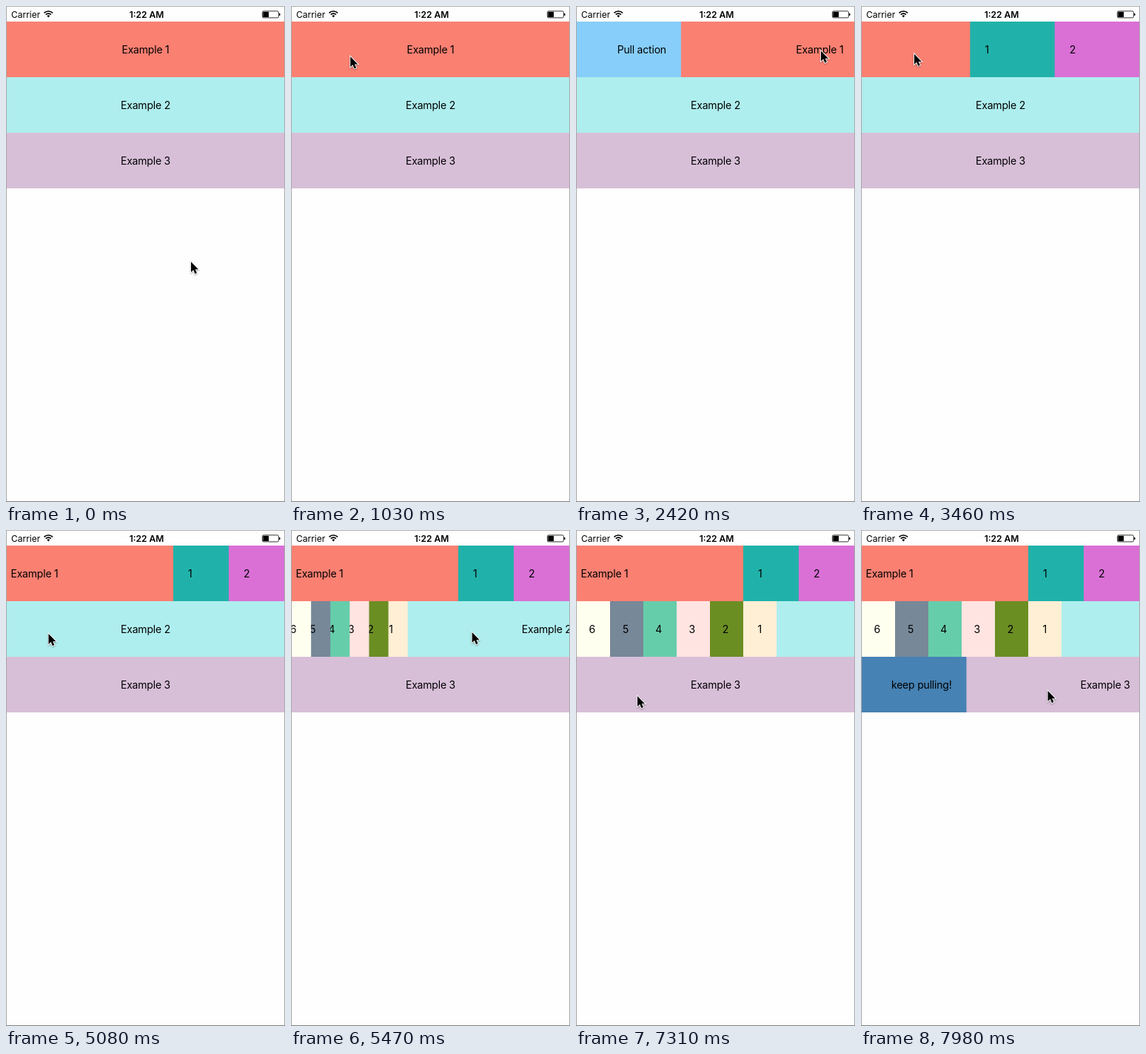
These frames come from a looping animation (377x669 px, 8 s). An HTML page with a canvas:

```html
<!DOCTYPE html>
<html lang="en">
<head>
<meta charset="utf-8">
<title>Swipeable rows</title>
<style>
html, body { margin: 0; width: 100%; height: 100%; overflow: hidden; background: #fefefe; }
canvas { display: block; width: 377px; height: 669px; }
</style>
</head>
<body>
<canvas id="stage" width="377" height="669"></canvas>
<script>
const ctx = document.getElementById('stage').getContext('2d');
const LOOP = 8000, LEFT = 1, W = 375, ROW = 75, PAD = 20;
const FONT = 'Inter, Roboto, sans-serif';

// Pointer: start, end, target x, target y, sharpness of the ease
const home = [250, 345];
const moves = [
  [570, 1170, 74, 58, 3],
  [1340, 2130, 331, 60.5, 6.83],
  [3070, 3770, 53, 65, 5],
  [4590, 4810, 57.5, 140, 3],
  [5080, 5590, 247, 138, 4],
  [6890, 7310, 83, 224, 3],
  [7550, 7980, 252.5, 217, 4]
];

function pointer(t) {
  let [x, y] = home;
  for (const [a, b, tx, ty, k] of moves) {
    if (t < a) break;
    const p = Math.min(1, (t - a) / (b - a));
    const e = 1 - Math.pow(1 - Math.pow(p, 1.5), k);
    x += (tx - x) * e;
    y += (ty - y) * e;
  }
  return [x, y];
}

// Row follows the pointer once it has passed the grab point
function drag(t, start, grab, dir) {
  if (t < start) return 0;
  const d = pointer(t)[0] - grab;
  return dir > 0 ? Math.max(0, d) : Math.min(0, d);
}

// Spring to the snap position, shown in a few discrete steps
function settle(t, from, to, begin, first, last, steps) {
  if (t < first) return from;
  const gap = (last - first) / (steps - 1);
  const shown = first + Math.floor((t - first) / gap) * gap;
  const p = Math.min(1, (shown - begin) / 250);
  return to + (from - to) * Math.pow(Math.cos(p * Math.PI / 2), 4);
}

function offsets(t) {
  let one;
  if (t < 3070) one = settle(t, drag(Math.min(t, 2340), 1340, 113, 1), 0, 2347, 2420, 2630, 4);
  else one = settle(t, drag(Math.min(t, 3940), 3070, 300.5, -1), -150, 3925, 3950, 4210, 6);
  const two = settle(t, drag(Math.min(t, 5900), 5080, 88, 1), 270, 5930, 6000, 6200, 4);
  return [one, two, drag(t, 7550, 111, 1)];
}

const rows = [
  { color: '#fa8072', label: 'Example 1',
    left: [['#87cefa', 'Pull action']],
    right: [['#20b2aa', '1'], ['#da70d6', '2']] },
  { color: '#afeeee', label: 'Example 2',
    left: [['#ffefd5', '1'], ['#6b8e23', '2'], ['#ffe4e1', '3'],
           ['#66cdaa', '4'], ['#778899', '5'], ['#fffff0', '6']] },
  { color: '#d8bfd8', label: 'Example 3',
    left: [['#4682b4', 'keep pulling!']] }
];

function box(color, x, y, w, h) {
  ctx.fillStyle = color;
  ctx.fillRect(x, y, w, h);
}

function text(str, x, y, align, font = '400 14px ', spacing = '-0.2px') {
  ctx.font = font + FONT;
  ctx.letterSpacing = spacing;
  ctx.textAlign = align;
  ctx.fillStyle = '#000';
  ctx.fillText(str, x, y);
}

function drawRow(row, i, dx) {
  const y = 21 + i * ROW, base = y + 42.5;
  ctx.save();
  ctx.beginPath();
  ctx.rect(LEFT, y, W, ROW);
  ctx.clip();
  box(row.color, LEFT, y, W, ROW);
  text(row.label, LEFT + W / 2 + dx, base, 'center');
  const panels = (dx > 0 ? row.left : dx < 0 ? row.right : null) || [];
  panels.forEach(([color, label], n) => {
    const share = dx * (1 - n / panels.length);
    const edge = dx > 0 ? LEFT + share : LEFT + W + share;
    box(color, dx > 0 ? edge - W : edge, y, W, ROW);
    text(label, dx > 0 ? edge - PAD : edge + PAD, base, dx > 0 ? 'right' : 'left');
  });
  ctx.restore();
}

function drawStatus() {
  text('Carrier', 7, 15.5, 'left', '400 12px ', '0px');
  text('1:22 AM', 190, 15.5, 'center', '600 12px ', '0px');
  // Wi-Fi
  ctx.strokeStyle = '#000';
  ctx.lineWidth = 1.7;
  for (const r of [5, 8.2]) {
    ctx.beginPath();
    ctx.arc(57.3, 15.2, r, -Math.PI * 0.75, -Math.PI * 0.25);
    ctx.stroke();
  }
  ctx.fillStyle = '#000';
  ctx.beginPath();
  ctx.moveTo(57.3, 15.6);
  ctx.arc(57.3, 15.2, 2.7, -Math.PI * 0.75, -Math.PI * 0.25);
  ctx.fill();
  // Battery
  ctx.lineWidth = 0.8;
  ctx.beginPath();
  ctx.roundRect(346.4, 6.9, 22, 9, 1.8);
  ctx.stroke();
  box('#000', 347.3, 7.8, 7.7, 7.2);
  ctx.beginPath();
  ctx.arc(369, 11.4, 1.7, -Math.PI / 2, Math.PI / 2);
  ctx.fill();
}

function drawFrame() {
  box('#b2b2b2', 0, 0, 377, 1);
  box('#a8a8a8', 0, 0, 1, 669);
  box('#a8a8a8', 376, 0, 1, 669);
  box('#828282', 0, 668, 377, 1);
}

const arrow = new Path2D('M0 0V14L3.2 11.1L5.4 16.2L7.9 15.1L5.7 10.2H10Z');

function drawPointer([x, y]) {
  ctx.save();
  ctx.translate(x, y);
  ctx.shadowColor = 'rgba(0,0,0,.35)';
  ctx.shadowBlur = 2;
  ctx.shadowOffsetY = 1;
  ctx.strokeStyle = '#fff';
  ctx.lineWidth = 1.8;
  ctx.stroke(arrow);
  ctx.shadowColor = 'transparent';
  ctx.fillStyle = '#000';
  ctx.fill(arrow);
  ctx.restore();
}

function draw(now) {
  const t = now % LOOP;
  box('#fefefe', 0, 0, 377, 669);
  drawStatus();
  const dx = offsets(t);
  rows.forEach((row, i) => drawRow(row, i, dx[i]));
  drawFrame();
  drawPointer(pointer(t));
}

let origin;
function tick(now) {
  if (origin === undefined) origin = now;
  draw(now - origin);
  requestAnimationFrame(tick);
}
requestAnimationFrame(tick);
</script>
</body>
</html>
```
